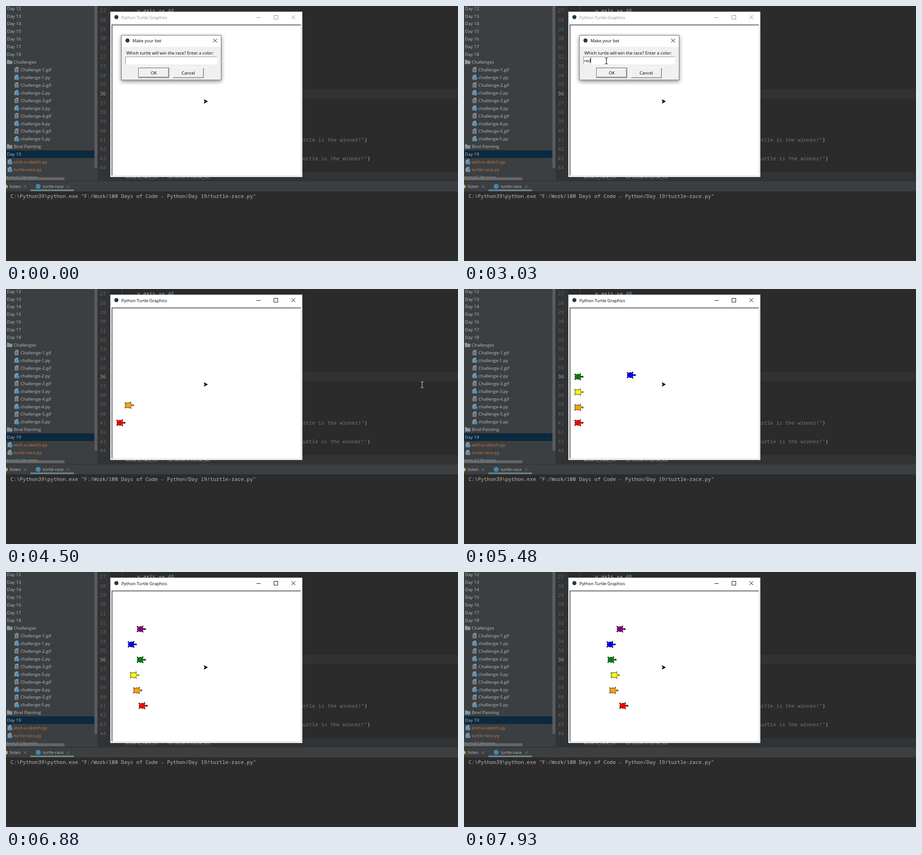
These frames come from a looping animation (997x562 px, 8 s). An HTML page:

```html
<!DOCTYPE html>
<html lang="en">
<head>
<meta charset="utf-8">
<title>Turtle race</title>
<style>
  html, body { margin: 0; width: 100%; height: 100%; overflow: hidden; background: #2b2b2b; }
  svg { display: block; width: 100vw; height: 100vh; }
  text { font: 9.8px "Open Sans", "Noto Sans", sans-serif; white-space: pre; }
  .mono { font: 11.29px "Noto Sans Mono", "DejaVu Sans Mono", monospace; }
  .ui { font-size: 9.5px; }
  .mid { text-anchor: middle; }
  .line { fill: none; stroke: currentColor; }
  #win { color: #8f8f8f; }
  #win.active { color: #000; }
  #win .ui { fill: currentColor; }
  #beam { mix-blend-mode: difference; }
  #dialog { filter: drop-shadow(0 3px 5px #0007); }
</style>
</head>
<body>
<svg viewBox="0 0 997 562" preserveAspectRatio="none">
  <g id="editor">
    <rect width="997" height="562" fill="#2b2b2b"/>
    <rect x="202" width="28" height="366" fill="#313335"/>
    <rect x="202" y="183" width="795" height="20.3" fill="#323232"/>
    <path d="M256.5 0V13" stroke="#4a4a4a"/>
    <text class="mono" x="289" y="14" fill="#a9b7c6">y_axis += <tspan fill="#6897bb">40</tspan></text>
    <rect x="202" y="366" width="795" height="20" fill="#313335"/>
    <text x="264" y="380.3" fill="#a5a5a5" class="ui">while is_race_on</text>
    <text x="345" y="380.3" fill="#777" class="ui">›</text>
    <text x="356" y="380.3" fill="#a5a5a5" class="ui">for turtle in turtle_list</text>
  </g>
  <g id="tree">
    <rect width="202" height="386" fill="#3c3f41"/>
    <rect y="318" width="195" height="17" fill="#0d293e"/>
    <rect x="195" width="6.5" height="357" fill="#595b5d"/>
  </g>
  <g id="console">
    <rect y="385" width="997" height="1.5" fill="#323232"/>
    <rect y="386.5" width="997" height="22" fill="#3c3f41"/>
    <rect x="54" y="404.5" width="96" height="3.5" fill="#6e8587"/>
    <circle cx="0" cy="398" r="4" fill="#c9a24a"/>
    <circle cx="71" cy="397.5" r="5.5" fill="#3f86b5"/>
    <text x="8" y="401.3" fill="#bbb">listen</text>
    <text x="81" y="401.3" fill="#bbb" class="ui">turtle-race</text>
    <path d="M39 395l6 6m0-6l-6 6M134.500 395l6 6m0-6l-6 6" stroke="#777a7c"/>
    <text class="mono" x="10" y="423.300" fill="#bbb">C:\Python39\python.exe "F:/Work/100 Days of Code - Python/Day 19/turtle-race.py"</text>
  </g>
  <g id="win">
    <rect x="230" y="12.500" width="423.500" height="364.500" fill="#fff"/>
    <rect x="231" y="39" width="421.500" height="337" fill="#f0f0f0"/>
    <rect x="233" y="41" width="417.500" height="333" fill="#fff"/>
    <path d="M233 41.700H650M233.800 41V373.500" fill="none" stroke="#454545" stroke-width="1.600"/>
    <path d="M234.500 373.500H650.500V42" fill="none" stroke="#e3e3e3"/>
    <path d="M230.500 12.500V376.500H653V12.500" fill="none" stroke="#d5d5d5" stroke-width=".7"/>
    <circle cx="243.500" cy="24.500" r="4.500" fill="#1d3a4d"/>
    <text class="ui" x="254.600" y="28.500">Python Turtle Graphics</text>
    <path class="line" d="M552.500 25.500h9M591 20.500h8.500v8.500H591zM629.500 20.500l8.500 8.500m0-8.500l-8.500 8.500"/>
    <polygon points="0,0 -9,-5 -7,0 -9,5" transform="translate(444.500 210.300) scale(.845)" stroke="#000"/>
    <g id="turtles"></g>
  </g>
  <g id="dialog">
    <rect x="254.500" y="64.500" width="220" height="98.500" fill="#f0f0f0"/>
    <rect x="254.500" y="64.500" width="220" height="25.500" fill="#fff"/>
    <rect x="254.500" y="64.500" width="220" height="98.500" fill="none" stroke="#6a6a6a"/>
    <circle cx="268" cy="76" r="4.500" fill="#1d3a4d"/>
    <text class="ui" x="279" y="80.200">Make your bet</text>
    <path d="M457 72l8.500 8.500m0-8.500l-8.500 8.500" stroke="#000"/>
    <text class="ui" x="265.500" y="106.500">Which turtle will win the race? Enter a color:</text>
    <rect x="263" y="111.500" width="202.500" height="17" fill="#fff"/>
    <path d="M263.500 128.500V112H465" fill="none" stroke="#858585"/>
    <text class="ui" id="answer" x="264.800" y="123.500"></text>
    <path id="caret" d="M0 113.500V126" stroke="#000"/>
    <rect x="292.200" y="136.500" width="67" height="21.500" fill="#f0f0f0" stroke="#555"/>
    <path d="M294 156.500H358V138" fill="none" stroke="#777"/>
    <path d="M293.500 156V137.800H357.500" fill="none" stroke="#fff"/>
    <path d="M368.500 157.500V136.500H435" fill="none" stroke="#fff"/>
    <path d="M368.500 157.800H435.500V136.500" fill="none" stroke="#666" stroke-width="1.300"/>
    <text class="ui mid" x="326" y="150.500">OK</text>
    <text class="ui mid" x="402" y="150.500">Cancel</text>
  </g>
  <path id="arrow" d="M0 0V13L3 10.300L5 15L7 14L5 9.700H9.300Z" fill="#fff" stroke="#000" stroke-width=".9"/>
  <path id="beam" d="M-3-6.500H-.8L0-6L.8-6.500H3M0-6V6M-3 6.500H-.8L0 6L.8 6.500H3" fill="none" stroke="#fff" stroke-width="1.200"/>
</svg>
<script>
const $ = id => document.getElementById(id);

function add(parent, tag, attrs, text = '') {
  const el = document.createElementNS(parent.namespaceURI, tag);
  for (const name in attrs) el.setAttribute(name, attrs[name]);
  el.textContent = text;
  return parent.appendChild(el);
}

// Editor lines
const lineY = n => 14.2 + (n - 27) * 20.34;
for (let n = 27; n <= 44; n++)
  add($('editor'), 'text', { class: 'mono', x: 207, y: lineY(n), fill: n === 36 ? '#a4a3a3' : '#606366' }, n);
for (const [n, end] of [[41, 797], [43, 803.5]]) {
  const code = add($('editor'), 'text', { class: 'mono', x: end, y: lineY(n), 'text-anchor': 'end', fill: '#73786f' }, 'turtle is the winner!"');
  add(code, 'tspan', { fill: '#a9b7c6' }, ')');
}

// Project tree
const icons = {
  folder(x, y) {
    add($('tree'), 'path', { d: `M${x} ${y - 5}h4.500l1.500 2h6v7.500h-12z`, fill: '#87939a' });
  },
  gif(x, y) {
    add($('tree'), 'path', { d: `M${x + 4} ${y - 6}h5.500v11.500h-8.500v-8.500z`, fill: '#87939a' });
    add($('tree'), 'path', { d: `M${x + 2.5} ${y - 1.5}h5.500m-5.500 2.500h5.500m-5.500 2.500h5.500`, stroke: '#3c4a55' });
  },
  py(x, y) {
    add($('tree'), 'path', { d: `M${x + 4} ${y - 6}h5v11h-8.500v-7.500z`, fill: '#87939a' });
    add($('tree'), 'circle', { cx: x + 7.5, cy: y + 2, r: 3.8, fill: '#4a90bd' });
  }
};
const rows = [12, 13, 14, 15, 16, 17, 18].map(day => ['Day ' + day, 2]);
rows.push(['Challenges', 17, 'folder']);
for (let i = 1; i <= 5; i++) rows.push([`Challenge-${i}.gif`, 32, 'gif'], [`challenge-${i}.py`, 32, 'py']);
rows.push(['Birel Painting', 17, 'folder'], ['Day 19', 2],
  ['etch-a-sketch.py', 17, 'py', '#c9783f'], ['turtle-race.py', 17, 'py', '#c9783f'], ['External Libraries', -9.5]);
rows.forEach(([label, x, icon, fill = '#bbb'], i) => {
  const y = 5 + i * 16.93;
  if (icon) icons[icon](x - (icon === 'folder' ? 15 : 14), y);
  add($('tree'), 'text', { x, y: y + 3.6, fill }, label);
});
add($('tree'), 'rect', { y: 377.5, width: 129, height: 6.5, fill: '#707274', opacity: .75 });

// Turtles
const half = [[16, 0], [14, 2], [10, 1], [7, 4], [9, 7], [8, 9], [5, 6], [1, 7], [-3, 5], [-6, 8], [-8, 6], [-5, 4], [-7, 0]];
const outline = [...half, ...half.slice(1, -1).reverse().map(([x, y]) => [x, -y])].join(' ');
const SCALE = .845, HOME = [444.5, 210.3], START_X = 250.2;
const RACE = [6125, 6320, 6880, 7160, 7930];
const turtles = [
  ['red', 3733, [0, 14, 49, 55, 99]],
  ['orange', 4145, [0, 8, 37, 48, 77]],
  ['yellow', 4537, [0, 6, 30, 44, 80]],
  ['green', 4929, [0, 10, 45, 52, 73]],
  ['blue', 5321, [0, 2, 25, 35, 71]],
  ['purple', 5713, [0, 12, 45, 55, 93]]
].map(([fill, born, run], i) => ({
  born, run,
  trip: i % 5 ? 392 : 412,
  y: HOME[1] + (100 - 40 * i) * SCALE,
  el: add($('turtles'), 'polygon', { points: outline, fill, stroke: '#000' })
}));

const clamp = v => Math.min(1, Math.max(0, v));
const mix = (a, b, u) => a + (b - a) * u;

function track(t, times, values) {
  let i = 0;
  while (i < times.length - 2 && t >= times[i + 1]) i++;
  return mix(values[i], values[i + 1], clamp((t - times[i]) / (times[i + 1] - times[i])));
}

const pointer = [
  [260, 836, 428], [540, 120, 190], [680, 114, 150], [820, 250, 106], [960, 314, 121],
  [3030, 314, 121], [3310, 331, 147], [3870, 331, 147], [4430, 918, 211], [4500, 918, 211],
  [4640, 927, 209], [5000, 974, 186]
];
const column = k => pointer.map(p => p[k]);
const [pointerT, pointerX, pointerY] = [0, 1, 2].map(column);

const within = (x, y, l, t, r, b) => x > l && x < r && y > t && y < b;
const show = (el, on) => el.style.visibility = on ? 'visible' : 'hidden';
const place = (el, x, y, extra = '') => el.setAttribute('transform', `translate(${x} ${y})${extra}`);

function drawPointer(t) {
  const x = track(t, pointerT, pointerX), y = track(t, pointerT, pointerY);
  const visible = t >= 260 && t < 5060;
  const entry = t < 3660 && within(x, y, 263, 111, 466, 129);
  const isArrow = !entry && (within(x, y, 0, 0, 202, 408) || within(x, y, 230, 12, 654, 377));
  show($('arrow'), visible && isArrow);
  show($('beam'), visible && !isArrow);
  place($('arrow'), x, y);
  place($('beam'), x, y);
}

function drawDialog(t) {
  const typed = 'red'.slice(0, t < 1900 ? 0 : t < 2160 ? 1 : t < 2430 ? 2 : 3);
  $('answer').textContent = typed;
  place($('caret'), [265, 268.8, 273.7, 279.5][typed.length], 0);
  const closing = clamp((t - 3660) / 210);
  show($('dialog'), closing < 1);
  $('dialog').style.opacity = 1 - closing;
  $('caret').style.display = t >= 1160 && t < 1830 || t >= 2160 && t < 2760 || t >= 3030 ? '' : 'none';
  $('win').classList.toggle('active', t >= 3660);
}

function drawTurtles(t) {
  for (const { born, run, trip, y, el } of turtles) {
    const u = clamp((t - born) / trip);
    show(el, t >= born);
    place(el, mix(HOME[0], START_X, u) + track(t, RACE, run), mix(HOME[1], y, u), ` scale(${SCALE})`);
  }
}

function step(t) {
  const base = t < 1160 ? 260 : 3030;
  return t >= 1160 && t < 3030 || t < 260 ? t : base + Math.floor((t - base) / 70) * 70;
}

function frame(now) {
  const t = step(now % 8000);
  drawDialog(t);
  drawTurtles(t);
  drawPointer(t);
  requestAnimationFrame(frame);
}
frame(performance.now());
</script>
</body>
</html>
```
